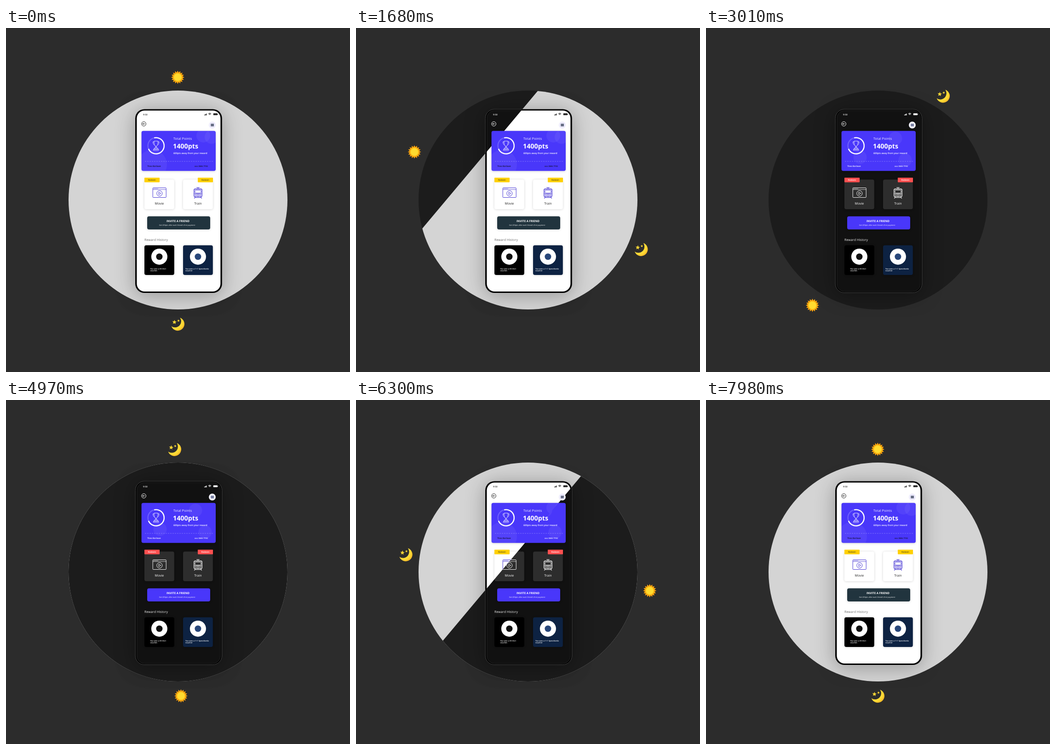
Write an HTML page with a canvas that moves like this. It is 748 by 748 pixels and loops after 9.03 s.

```html
<!DOCTYPE html>
<html lang="en">
<head>
<meta charset="utf-8">
<title>Light and dark theme</title>
<style>
html, body { margin: 0; width: 100%; height: 100%; overflow: hidden; background: #2c2c2c; }
canvas { display: block; width: 748px; height: 748px; }
</style>
</head>
<body>
<canvas id="stage"></canvas>
<script>
const SIZE = 748, LOOP = 9030, STEP = 70, TAU = Math.PI * 2;
const MID = 374, DISC = 238, WIPE_ANGLE = 40 * Math.PI / 180, WIPE_SPEED = 0.356;
const ORBIT = { x: 373.4, y: 375.4, r: 268.2 };
const BLUE = '#4937fa';
const dpr = window.devicePixelRatio || 1;

const LIGHT = {
  disc: '#d4d4d4', screen: '#fff', text: '#222', muted: '#686868', icon: '#4838d4',
  tag: '#ffd000', tagText: '#222', tile: '#fff', button: '#21343e', menu: '#eceafd',
  menuLine: '#26324a', owner: '#14122e', shadow: 'rgba(0,0,0,.3)', tileShadow: 'rgba(0,0,0,.17)',
  bubbles: [[318, 297, 32], [429, 234, 15], [447, 237, 15]]
};
const DARK = {
  disc: '#1c1c1c', screen: '#111', text: '#fff', muted: '#f2f2f2', icon: '#f4f4f4',
  tag: '#ff5050', tagText: '#fff', tile: '#2d2d2d', button: BLUE, menu: '#f1f1fc',
  menuLine: '#3f4a78', owner: '#fff', shadow: 'rgba(0,0,0,.35)', tileShadow: 'rgba(0,0,0,.3)',
  bubbles: [[412, 240, 14.5], [335, 281, 14.5], [433, 287, 14.5]]
};

let c;

function makeCanvas(el) {
  el.width = el.height = Math.round(SIZE * dpr);
  const ctx = el.getContext('2d');
  ctx.scale(dpr, dpr);
  return ctx;
}

function fill(color) { c.fillStyle = color; c.fill(); }

function stroke(color, width) { c.strokeStyle = color; c.lineWidth = width; c.stroke(); }

function box(x, y, w, h, r = 0) { c.beginPath(); c.roundRect(x, y, w, h, r); }

function dot(x, y, r) { c.beginPath(); c.arc(x, y, r, 0, TAU); }

function line(...p) {
  c.beginPath();
  for (let i = 0; i < p.length; i += 2) c.lineTo(p[i], p[i + 1]);
}

function shadowed(color, blur, dy, draw) {
  c.save();
  c.shadowColor = color;
  c.shadowBlur = blur * dpr;
  c.shadowOffsetY = dy * dpr;
  draw();
  c.restore();
}

function text(str, x, y, size, color, { weight = 400, align = 'left', gap = 0 } = {}) {
  c.font = `${weight} ${size}px "Open Sans", "Noto Sans", sans-serif`;
  c.letterSpacing = gap + 'px';
  c.textAlign = align;
  c.fillStyle = color;
  c.fillText(str, x, y);
}

function drawStatus(t) {
  text('9:50', 298, 189.7, 4.7, t.text, { weight: 600, gap: 0.15 });
  for (let i = 0; i < 4; i++) {
    box(431 + i * 1.45, 188.6 - i * 0.9, 1.1, 1.4 + i * 0.9, 0.2);
    fill(t.text);
  }
  for (const r of [1.6, 3.1, 4.6]) {
    c.beginPath();
    c.arc(443, 189.8, r, -Math.PI * 0.74, -Math.PI * 0.26);
    stroke(t.text, 0.95);
  }
  box(450.8, 185.6, 9, 4, 0.9);
  fill(t.text);
  box(460.2, 186.8, 0.8, 1.6, 0.3);
  fill(t.text);
}

function drawNav(t) {
  dot(299.6, 208.5, 4.8);
  stroke(t.text, 1);
  line(302.2, 208.5, 297, 208.5);
  stroke(t.text, 0.9);
  line(299, 206.4, 296.9, 208.5, 299, 210.6);
  stroke(t.text, 0.9);
  dot(448.5, 211, 7.5);
  fill(t.menu);
  for (const y of [209.1, 211, 212.9]) {
    line(445.3, y, 452, y);
    stroke(t.menuLine, 1.3);
  }
}

function drawTrophy() {
  c.beginPath();
  c.moveTo(322, 246);
  c.lineTo(330.4, 246);
  c.bezierCurveTo(330.4, 252, 330, 257, 326.2, 257);
  c.bezierCurveTo(322.4, 257, 322, 252, 322, 246);
  for (const s of [-1, 1]) {
    c.moveTo(326.2 + s * 4.2, 247.6);
    c.lineTo(326.2 + s * 6.6, 247.6);
    c.bezierCurveTo(326.2 + s * 6.6, 252, 326.2 + s * 5, 253.6, 326.2 + s * 3.4, 254.4);
  }
  c.moveTo(325.2, 257);
  c.lineTo(325.2, 261);
  c.moveTo(327.2, 257);
  c.lineTo(327.2, 261);
  c.rect(322.4, 261, 7.6, 2.6);
  c.rect(320.6, 263.6, 11.2, 2.4);
  stroke('#fff', 0.8);
}

function drawPoints(t) {
  shadowed(t.tileShadow, 5, 1, () => { box(294.6, 223.8, 161.4, 87, 4); fill(BLUE); });
  c.save();
  box(294.6, 223.8, 161.4, 87, 4);
  c.clip();
  for (const b of t.bubbles) { dot(...b); fill('rgba(255,255,255,.055)'); }
  c.restore();

  dot(326.2, 256, 17.6);
  stroke('rgba(255,255,255,.2)', 2.4);
  c.beginPath();
  c.arc(326.2, 256, 17.6, -1.8, 2.75);
  stroke('#fff', 2.4);
  drawTrophy();

  text('Total Points', 364, 243.2, 7, '#fff', { gap: 0.2 });
  text('1400pts', 363, 261.8, 14.3, '#fff', { weight: 700 });
  text('600pts away from your reward', 364, 274.4, 5, '#fff', { weight: 600 });
  c.setLineDash([3, 2]);
  line(302, 290, 450, 290);
  stroke('rgba(255,255,255,.4)', 0.7);
  c.setLineDash([]);
  text('Theo Barlowe', 307, 302, 4.5, t.owner, { weight: 600 });
  text('xxx 3046 7192', 410, 302, 4.3, t.owner, { weight: 600 });
}

function drawMovie(color) {
  box(319.2, 347.5, 29, 21, 1);
  stroke(color, 1);
  line(319.2, 351.2, 348.2, 351.2);
  stroke(color, 0.8);
  line(321, 349.4, 331, 349.4);
  c.setLineDash([2, 1]);
  stroke(color, 0.8);
  c.setLineDash([]);
  dot(333.8, 359.6, 6);
  stroke(color, 1);
  line(332, 356.8, 337, 359.6, 332, 362.4);
  c.closePath();
  stroke(color, 0.9);
}

function drawTrain(color) {
  box(408.8, 350, 17.4, 16.8, 2.6);
  stroke(color, 1.3);
  box(411, 352.4, 13, 6.6, 0.8);
  stroke(color, 1);
  line(408.8, 360.6, 426.2, 360.6);
  stroke(color, 0.9);
  for (const x of [412.6, 422.4]) {
    dot(x, 363.5, 1.4);
    stroke(color, 0.9);
  }
  box(415.8, 362, 3.4, 3);
  stroke(color, 0.8);
  line(414, 347, 421, 347);
  stroke(color, 1.1);
  line(417.5, 347, 417.5, 350);
  stroke(color, 1);
  line(411.6, 367, 409.4, 370.8);
  stroke(color, 1.2);
  line(423.4, 367, 425.6, 370.8);
  stroke(color, 1.2);
  line(411, 368.8, 424, 368.8);
  stroke(color, 0.9);
}

function drawTile(t, x, label, tagX, icon) {
  shadowed(t.tileShadow, 5, 0.5, () => { box(x, 329.4, 64.8, 64.6, 4); fill(t.tile); });
  box(tagX, 325.4, 33, 10, 0.8);
  fill(t.tag);
  text('Redeem', tagX + 16.5, 331.9, 4.4, t.tagText, { weight: t === DARK ? 600 : 400, align: 'center' });
  icon(t.icon);
  text(label, x + 32.4, 383.6, 7, t.text, { align: 'center' });
}

function drawReward(t, x, color, mark, textX, rows) {
  shadowed(t.tileShadow, 5, 0.5, () => { box(x, 472.4, 64.8, 64.6, 4); fill(color); });
  dot(x + 32.4, 497.2, 17.5);
  fill('#fff');
  dot(x + 32.4, 497.2, 7);
  fill(mark);
  rows.forEach((row, i) => text(row, textX, 524.6 + i * 4.6, 4, '#fff', { weight: 600 }));
}

function drawPhone(t) {
  shadowed(t.shadow, 44, 5, () => { box(281, 176.4, 188.8, 399.6, 20); fill('#000'); });
  if (t === DARK) {
    box(281.3, 176.8, 188.2, 398.8, 19.6);
    stroke('#565656', 0.8);
  }
  box(284.4, 179.4, 182, 393.6, 17);
  fill(t.screen);
  if (t === DARK) stroke('#333', 0.7);
}

function drawTheme(t) {
  c = makeCanvas(document.createElement('canvas'));
  c.textRendering = 'geometricPrecision';
  dot(MID, MID, DISC);
  fill(t.disc);
  drawPhone(t);
  drawStatus(t);
  drawNav(t);
  drawPoints(t);
  drawTile(t, 301, 'Movie', 301, drawMovie);
  drawTile(t, 385, 'Train', 417, drawTrain);
  shadowed(t.tileShadow, 5, 1, () => { box(307, 409.4, 137, 28.6, 4); fill(t.button); });
  text('INVITE A FRIEND', 374, 421.9, 6.15, '#fff', { weight: 700, align: 'center' });
  text("Get 200pts after each friend's first payment", 372, 430.4, 3.9, '#fff', { align: 'center' });
  text('Reward History', 301, 462.6, 7, t.muted, { gap: 0.1 });
  drawReward(t, 301, '#000', '#111', 313.4, ['You won a $5 Ovri', 'voucher.']);
  drawReward(t, 385, '#0d2242', '#27467a', 390, ['You won a 1+1 SpecsVarda', 'voucher']);
  return c.canvas;
}

function star(x, y, outer, inner, points, turn = 0) {
  c.beginPath();
  for (let i = 0; i < points * 2; i++) {
    const a = turn - Math.PI / 2 + i * Math.PI / points;
    const r = i % 2 ? inner : outer;
    c.lineTo(x + r * Math.cos(a), y + r * Math.sin(a));
  }
  c.closePath();
}

function drawSun(x, y) {
  star(x, y, 14.5, 10.6, 16);
  fill('#fda50d');
  dot(x, y, 9.2);
  fill('#fdc31c');
  dot(x, y, 8);
  fill('#ffdb2f');
}

function drawMoon(x, y) {
  const shade = c.createRadialGradient(x - 4, y - 4, 8, x - 4, y - 4, 20);
  shade.addColorStop(0, '#ffe03a');
  shade.addColorStop(0.6, '#fdd835');
  shade.addColorStop(1, '#f6b626');
  const top = -70 * Math.PI / 180, left = 160 * Math.PI / 180;
  const cx = x - 5.9, cy = y - 5.9;
  const hornAngle = a => Math.atan2(y + 14.6 * Math.sin(a) - cy, x + 14.6 * Math.cos(a) - cx);
  c.beginPath();
  c.arc(x, y, 14.6, top, left);
  c.arc(cx, cy, 13.4, hornAngle(left), hornAngle(top), true);
  c.closePath();
  fill(shade);
  star(x - 7.2, y - 4, 5, 2.2, 5, 0.1);
  fill('#fdd835');
  star(x + 1.6, y - 7.2, 2.9, 1.3, 5, -0.1);
  fill('#fdd835');
}

const view = makeCanvas(document.getElementById('stage'));
const light = drawTheme(LIGHT), dark = drawTheme(DARK);

const progress = (t, start, length) => Math.min(1, Math.max(0, (t - start) / length));

const put = layer => view.drawImage(layer, 0, 0, SIZE, SIZE);

// Shows the part of a layer beyond the moving diagonal edge.
function putBeyond(layer, start, t) {
  const edge = (t - start) * WIPE_SPEED - DISC;
  if (edge > DISC + 2) return;
  view.save();
  view.translate(MID, MID);
  view.rotate(WIPE_ANGLE);
  view.beginPath();
  view.rect(Math.max(edge, -SIZE), -SIZE, SIZE * 2, SIZE * 2);
  view.restore();
  view.save();
  view.clip();
  put(layer);
  view.restore();
}

function render(t) {
  c = view;
  c.fillStyle = '#2c2c2c';
  c.fillRect(0, 0, SIZE, SIZE);
  if (t < 4970) {
    put(dark);
    putBeyond(light, 1394, t);
  } else {
    put(light);
    putBeyond(dark, 5760, t);
  }
  const turn = Math.PI * (progress(t, 588, 2945) + progress(t, 4945, 2990));
  const dx = ORBIT.r * Math.sin(turn), dy = ORBIT.r * Math.cos(turn);
  drawSun(ORBIT.x - dx, ORBIT.y - dy);
  drawMoon(ORBIT.x + dx, ORBIT.y + dy);
}

const began = performance.now();

function tick() {
  const t = (performance.now() - began) % LOOP;
  render(Math.floor(t / STEP) * STEP);
  requestAnimationFrame(tick);
}
tick();
</script>
</body>
</html>
```
